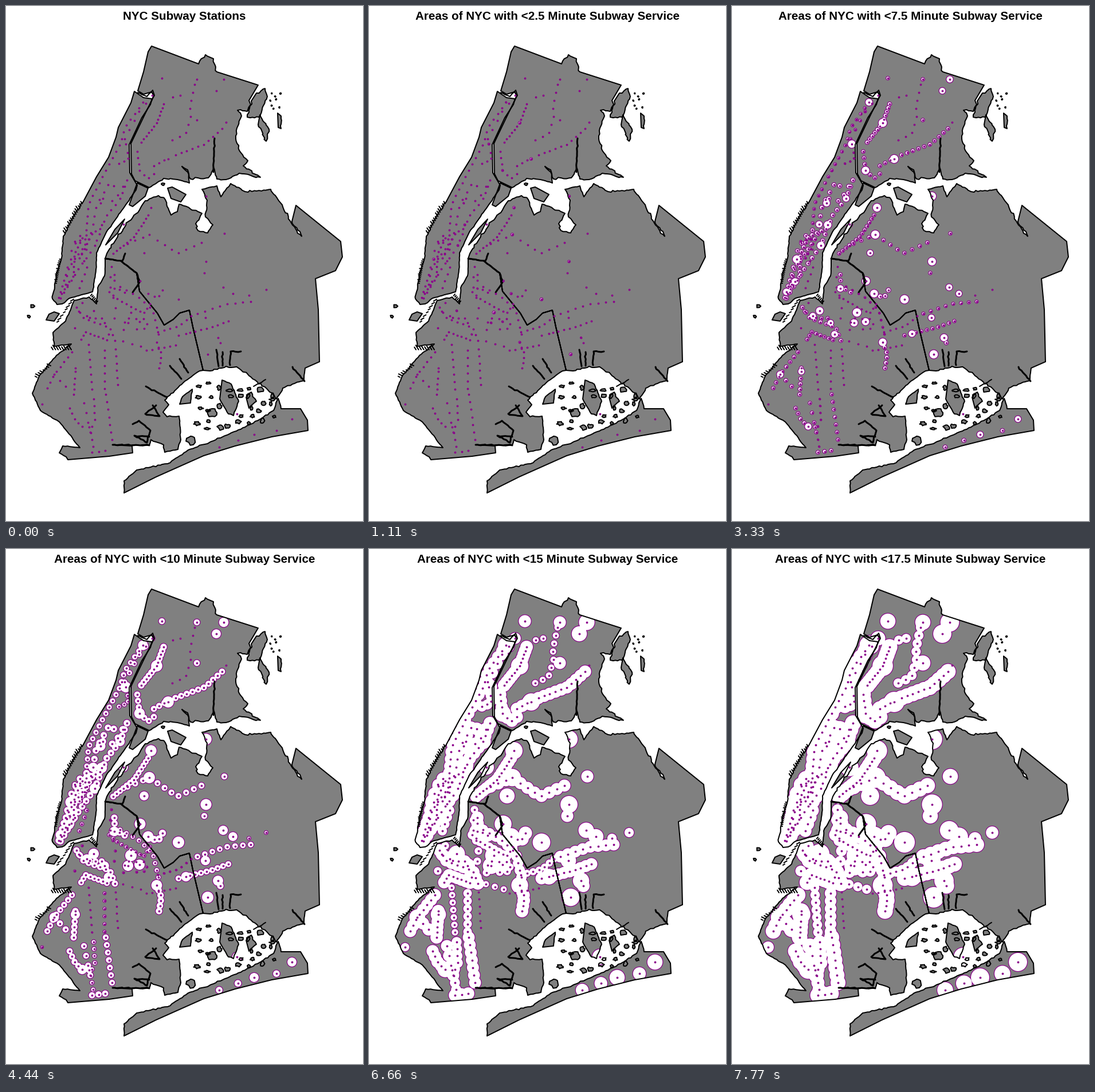
A matplotlib script that plays this animation: 623x899 px, repeating every 8000 ms.

```python
import numpy as np
import matplotlib.pyplot as plt
from matplotlib.animation import FuncAnimation
from matplotlib.patches import PathPatch
from matplotlib.path import Path

W, H, DPI = 623, 899, 64
PX = 72 / DPI                       # one pixel in points
LOOP, STEP, HOLD = 8000, 20, 1110
GRAY, PURPLE = "#808080", "#8b008b"
NEVER = 99
rng = np.random.default_rng(4)


# ---------- geometry helpers ----------
def pts(*v):
    return np.array(v, float).reshape(-1, 2)


def spread(p, n):
    """n points evenly spaced along polyline p."""
    d = np.r_[0, np.cumsum(np.hypot(*np.diff(p, axis=0).T))]
    t = np.linspace(0, d[-1], n)
    return np.c_[np.interp(t, d, p[:, 0]), np.interp(t, d, p[:, 1])]


def coast(*v, amp=0.8, step=4):
    """Ragged shore through a few key points."""
    p = pts(*v)
    out = [p[:1]]
    for a, b in zip(p[:-1], p[1:]):
        n = max(1, int(np.hypot(*(b - a)) / step))
        seg = a + (b - a) * (np.arange(1, n + 1) / n)[:, None]
        seg[:-1] += rng.normal(0, amp, (n - 1, 2))
        out.append(seg)
    return np.vstack(out)


def blob(x, y, rx, ry, n=11):
    a = np.linspace(0, 2 * np.pi, n, endpoint=False)
    k = rng.uniform(0.6, 1.2, n)
    return np.c_[x + rx * k * np.cos(a), y + ry * k * np.sin(a)]


def closed(*parts):
    p = np.vstack(parts)
    return Path(np.vstack([p, p[:1]]), closed=True)


def piers(x0, y0, x1, y1, n, dx, dy):
    """Short strokes standing out from a shore."""
    for x, y in spread(pts(x0, y0, x1, y1), n):
        k = rng.uniform(0.4, 1.1)
        strokes.append(Path([(x, y), (x + dx * k, y + dy * k)]))


# ---------- land ----------
bronx = closed(
    pts(230, 148, 240, 115, 248, 80, 254, 70, 336, 101),
    coast(338, 96, 348, 85, 362, 92, 368, 115, amp=1),
    pts(440, 138),
    coast(424, 165, 427, 172, 421, 184, 404, 182, 411, 192, 403, 213, 401, 232,
          407, 252, 422, 270, 414, 279, 444, 299, 407, 292, 384, 303, 368, 302,
          362, 282, 353, 300, 322, 302, 319, 293, 307, 280, 317, 286, 320, 309,
          299, 303, 275, 301, 250, 317),
    pts(225, 305, 219, 293, 218, 240, 239, 196, 258, 157, 254, 150, 240, 154))

manhattan = closed(
    pts(224, 149, 240, 160, 255, 162, 252, 172, 237, 195, 215, 242, 216, 291, 229, 313),
    coast(227, 321, 207, 350, 175, 395, 158, 431, 157, 460, 151, 499, 111, 510,
          98, 520, amp=0.3),
    coast(89, 521, 81, 511, 89, 465, 97, 440, 100, 402, 117, 368, 134, 343, amp=0.6),
    pts(158, 298, 179, 264, 192, 229, 196, 212, 218, 169))

border = pts(173, 441, 200, 445, 228, 466, 233, 498, 264, 536, 276, 557, 292, 547,
             303, 536, 320, 531, 326, 560, 344, 636)

queens = closed(
    coast(176, 432, 214, 376, 233, 356, 243, 340, 266, 331, 278, 338, 288, 365,
          299, 359, 302, 346, 342, 362, 331, 380, 335, 392, 352, 396, 361, 382,
          348, 368, 351, 339, 342, 320, 368, 314, 375, 333, 392, 310, 417, 324,
          462, 320, 482, 347, 498, 379, 516, 402, 499, 376),
    pts(506, 348, 584, 411, 587, 438, 575, 462, 540, 476, 545, 530, 547, 621),
    coast(522, 632, 520, 654, 500, 660, 483, 667, 472, 686, 455, 668, 407, 633,
          384, 629, 356, 637),
    border[::-1])

brooklyn = closed(
    border,
    coast(338, 637, 312, 655, 277, 688, 284, 696, 274, 709, 281, 717, 302, 716,
          305, 757, 300, 774, 277, 779, 275, 766, 253, 757, 250, 767, 186, 766, amp=0.5),
    pts(220, 768, 221, 780, 180, 786, 108, 792),
    coast(105, 787, 93, 780, 99, 768, 129, 771, 110, 747, 93, 726, 60, 706, 46, 676,
          58, 646, 88, 610, 114, 590, 84, 594, 82, 570, 104, 550, 119, 514, 145, 508,
          158, 520, 160, 492, 172, 471, 173, 455, amp=0.4))

rockaway = closed(
    coast(206, 850, 206, 829, 228, 810, 282, 799, 318, 775, 362, 759, 402, 742,
          446, 720, 467, 706, 475, 685, 480, 703, amp=0.5),
    pts(514, 703, 526, 723, 527, 741, 464, 752, 400, 768, 345, 785, 262, 822))

isles = [
    pts(229, 309, 248, 318, 243, 332, 221, 350, 215, 347),
    pts(174, 417, 190, 390, 207, 372, 195, 396),
    pts(282, 318, 290, 316, 314, 329, 305, 342, 288, 336),
    pts(70, 548, 75, 538, 84, 534, 93, 537, 84, 550),
    coast(437, 152, 452, 144, 456, 158, 442, 194, 421, 194, 428, 166),
    coast(443, 190, 459, 215, 454, 236, 440, 207),
    coast(474, 187, 480, 192, 480, 214, 475, 212),
    coast(303, 695, 308, 682, 325, 669, 322, 693, amp=0.5),
    coast(377, 653, 393, 660, 406, 690, 397, 715, 388, 712, 373, 686),
    coast(419, 683, 428, 674, 437, 690, 424, 702),
    blob(323, 757, 9, 9), blob(361, 710, 9, 8), blob(274, 311, 3, 2),
    blob(47, 524, 4, 4, 5), blob(40, 542, 3, 3, 5),
]
# marsh islets scattered over the bay, which narrows to the east
for u in np.linspace(0, 1, 8):
    for v in np.linspace(0, 1, 5):
        x, y = 336 + 128 * u, 660 + 16 * u + (86 - 45 * u) * v
        dx, dy, rx, ry = rng.uniform([-5, -5, 2, 2], [5, 5, 6, 5])
        if rng.random() < 0.75:
            isles.append(blob(x + dx, y + dy, rx, ry))
for x, y in rng.uniform((455, 152), (480, 182), (8, 2)):
    isles.append(blob(x, y, 1.2, 1.2, 6))
areas = [bronx, manhattan, queens, brooklyn, rockaway] + [closed(s) for s in isles]
land = Path.make_compound_path(*areas)

# ---------- piers, creeks and basins ----------
strokes = []
piers(103, 397, 133, 345, 15, -4, -6)
piers(96, 442, 88, 484, 14, -5, 0)
piers(114, 600, 82, 600, 8, -5, -8)
piers(78, 628, 54, 648, 8, -6, -3)
piers(118, 512, 92, 550, 8, -5, 3)
piers(150, 503, 160, 515, 6, -4, 5)
strokes += [Path(coast(*s, amp=0.4)) for s in [
    (230, 151, 246, 158, 256, 147, 259, 156, 254, 165), (432, 664, 453, 652)]]
creeks = [Path(coast(*s, amp=0.5)) for s in [
    (364, 231, 363, 262, 362, 290), (173, 441, 203, 445, 208, 432),
    (203, 447, 228, 466, 233, 482, 221, 500), (410, 603, 392, 603, 391, 627),
    (367, 600, 371, 629), (378, 604, 378, 628), (303, 616, 318, 640),
    (286, 628, 306, 651), (244, 664, 281, 683), (500, 630, 521, 655),
    (262, 697, 243, 712, 268, 716, 256, 697), (186, 766, 250, 767),
    (221, 730, 232, 724, 252, 741, 246, 762, 224, 750, 250, 752)]]

# ---------- stations: [x, y, minutes of headway] ----------
stations = []


def route(wait, n, *v):
    """n evenly spaced stops along a line that share one headway."""
    stations.extend([x, y, wait] for x, y in spread(pts(*v), n))


# Bronx
route(4.8, 14, 377, 214, 347, 241, 285, 264, 258, 279)
route(4.5, 12, 275, 171, 263, 204, 236, 238)
route(4.8, 7, 229, 254, 233, 287, 248, 301, 258, 293)
route(9.7, 9, 329, 137, 321, 175, 322, 193, 313, 224, 290, 234)
route(9.9, 2, 304, 156, 291, 159)
route(4.9, 2, 333, 128, 333, 199)
route(4.9, 1, 272, 126)
route(NEVER, 1, 384, 203)

# Manhattan
route(5.5, 20, 239, 168, 207, 213, 199, 241, 165, 304, 144, 346, 141, 379)
route(5.6, 6, 255, 156, 231, 186, 207, 232)
route(6.5, 5, 212, 246, 213, 269, 197, 275)
route(4.5, 14, 178, 312, 157, 349, 152, 381, 128, 402, 109, 437, 104, 486)
route(4.4, 21, 211, 304, 199, 336, 175, 366, 155, 418, 126, 459, 95, 510)
route(4.4, 5, 188, 314, 204, 314, 189, 341, 169, 336)
route(4.6, 18, 164, 389, 134, 402, 119, 433, 118, 471, 92, 509)
route(4.6, 12, 150, 398, 133, 424, 113, 451, 102, 474, 95, 499)
route(7.2, 7, 140, 425, 131, 431, 141, 457, 128, 492)
route(6, 8, 120, 411, 146, 406, 128, 440)

# Queens
route(5, 13, 248, 365, 224, 402, 187, 432)
route(4.9, 11, 212, 415, 250, 399, 299, 432, 341, 413)
route(4.9, 2, 381, 397, 346, 466)
route(4, 4, 248, 502, 265, 510, 273, 496)
route(5.2, 8, 427, 516, 384, 520, 334, 537)
route(7.2, 2, 454, 495, 424, 505)
route(5, 10, 388, 550, 358, 561, 301, 575)
route(9, 7, 323, 541, 302, 559, 265, 569)
route(4.5, 2, 370, 579, 374, 588)
route(4.4, 5, 372, 770, 433, 748, 479, 740, 499, 721)

# Brooklyn
route(6.3, 10, 199, 490, 230, 507, 256, 531, 266, 573)
route(4.5, 6, 263, 587, 271, 608, 267, 632)
route(4.6, 5, 189, 469, 190, 490, 207, 500)
route(7.4, 11, 180, 499, 195, 512, 240, 537, 251, 520)
route(8.6, 6, 184, 455, 181, 486, 192, 532, 189, 545)
route(8.6, 8, 205, 565, 208, 545, 244, 546, 247, 562, 228, 564)
route(4.7, 10, 123, 526, 136, 545, 181, 561, 190, 584)
route(5, 8, 131, 582, 139, 569, 176, 583)
route(5, 5, 127, 533, 147, 545, 167, 545)
route(8.5, 2, 133, 518, 120, 562)
route(9.8, 3, 204, 585, 235, 594)
route(NEVER, 6, 245, 601, 257, 600, 296, 592)
route(NEVER, 6, 191, 599, 195, 661)
route(9.5, 7, 144, 591, 150, 669)
route(6.6, 8, 153, 686, 155, 723, 147, 740, 152, 769)
route(7.8, 6, 172, 601, 172, 668)
route(5, 7, 174, 678, 185, 757)
route(4.9, 8, 115, 604, 84, 643, 72, 667)
route(4.7, 3, 84, 643, 104, 664)
route(4.6, 6, 121, 632, 118, 678)
route(4.8, 6, 111, 702, 122, 726, 145, 735)
route(5, 4, 136, 693, 147, 744)
route(4.7, 3, 150, 779, 173, 776)
route(8, 1, 63, 695)

# interchanges where trains come most often; each absorbs a stop close by
hubs = pts(301, 512, 218, 535, 352, 608, 250, 399, 263, 204, 283, 267, 349, 332,
           253, 352, 349, 446, 113, 442, 234, 480, 248, 502, 263, 587, 209, 241,
           233, 287, 167, 382, 155, 418, 153, 532, 213, 553, 233, 551, 370, 579)
lesser = pts(239, 168, 165, 344, 110, 481, 95, 499, 189, 493, 179, 573, 314, 572,
             84, 643, 133, 734, 380, 128, 199, 336, 152, 381, 379, 491, 141, 541,
             348, 544, 121, 638, 403, 712, 433, 748, 499, 721, 367, 148, 241, 431,
             396, 502, 172, 553, 205, 381)
for group, lo, hi in [(hubs, 0.4, 1.5), (lesser, 1.8, 2.6)]:
    for (x, y), wait in zip(group, np.linspace(lo, hi, len(group))):
        near = min(stations, key=lambda s: np.hypot(s[0] - x, s[1] - y))
        if np.hypot(near[0] - x, near[1] - y) < 6:
            near[:] = x, y, wait
        else:
            stations.append([x, y, wait])


# ---------- drawing ----------
def reach(minutes):
    """All walking circles for one time limit as a single path."""
    sized = [(x, y, 1.07 * (minutes - w) - 0.2) for x, y, w in stations]
    return Path.make_compound_path(
        *[Path.circle((x, y), r) for x, y, r in sized if r > 0.3])


fig = plt.figure(figsize=(W / DPI, H / DPI), dpi=DPI, facecolor="white")
ax = fig.add_axes([0, 0, 1, 1])
ax.set(xlim=(0, W), ylim=(H, 0))
ax.axis("off")


def draw(path, z, fill="none", edge="none", width=0.0, clip=False):
    patch = PathPatch(path, fc=fill, ec=edge, lw=width * PX, zorder=z,
                      joinstyle="round", capstyle="round")
    ax.add_patch(patch)
    if clip:
        patch.set_clip_path(land, ax.transData)
    return patch


limits = [2.5 * k for k in range(8)]
circles = [reach(m) for m in limits]
draw(land, 1, fill=GRAY)
rings = draw(circles[-1], 2, PURPLE, PURPLE, 2.4, clip=True)
discs = draw(circles[-1], 3, "white", clip=True)
draw(Path.make_compound_path(land, *strokes), 4, edge="black", width=2)
draw(Path.make_compound_path(*creeks), 4, edge="black", width=3)
xy = np.array(stations)
ax.plot(xy[:, 0], xy[:, 1], "o", ms=3.8 * PX, mfc=PURPLE, mec="none", zorder=5)
title = ax.text(W / 2, 24, "", ha="center", va="baseline", family="Liberation Sans",
                weight="bold", size=20.6 * PX, color="black")


def update(frame):
    k = min((frame * STEP + STEP // 2) // HOLD, len(limits) - 1)
    for patch in (rings, discs):
        patch.set_visible(k > 0)
        if k:
            patch.set_path(circles[k])
    title.set_text(f"Areas of NYC with <{limits[k]:g} Minute Subway Service" if k
                   else "NYC Subway Stations")
    return rings, discs, title


anim = FuncAnimation(fig, update, frames=LOOP // STEP, interval=STEP,
                     init_func=lambda: update(0), repeat=True, repeat_delay=0)
plt.show()
```
